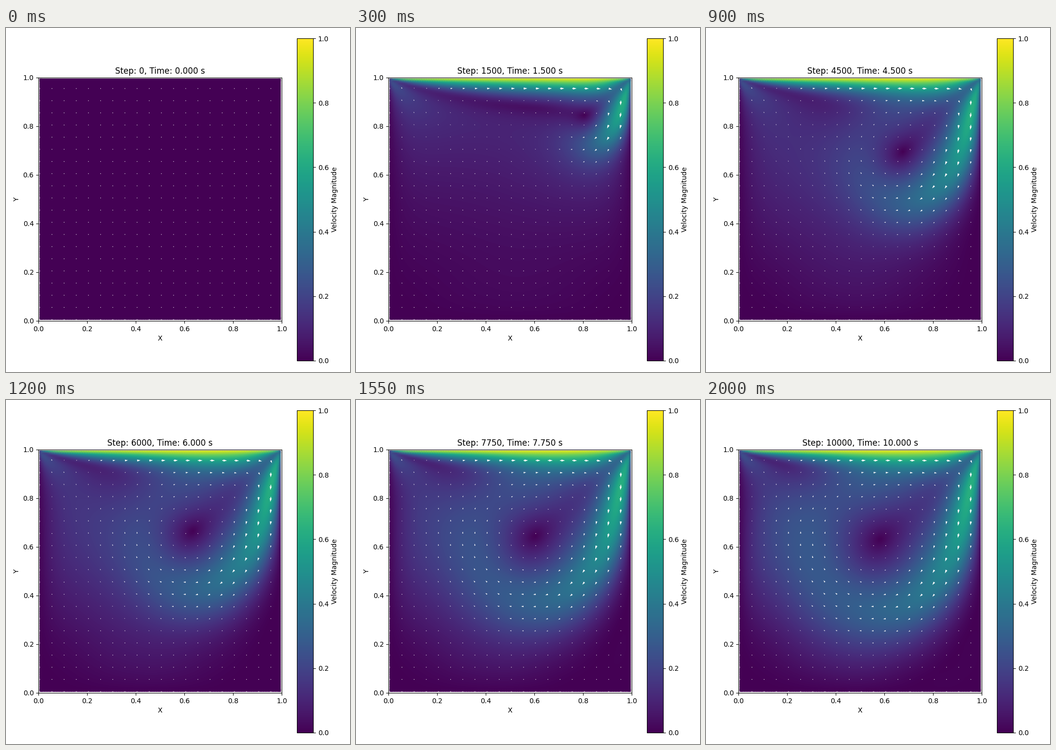
Animation, 700 px wide and 700 px high, one loop 2.05 s. Source, as a matplotlib script:

```python
import numpy as np
import matplotlib.pyplot as plt
from matplotlib.animation import FuncAnimation
from matplotlib.patches import Rectangle

# Lid-driven cavity on a staggered grid
N = 100
H = 1 / N
NU = 1 / 400
LID = 1.0
FRAMES = 41
STEPS = 75               # solver steps per frame
DT = 0.25 / STEPS

# Cosine basis that diagonalises the Neumann Laplacian
k = np.arange(N)
C = np.cos(np.pi * np.outer(k + 0.5, k) / N) * np.sqrt(2 / N)
C[:, 0] /= np.sqrt(2)
eig = (2 * np.sin(np.pi * k / (2 * N)) / H) ** 2
LAM = -(eig[:, None] + eig[None, :])
LAM[0, 0] = np.inf


def centred(u, v):
    return (u[:, 1:] + u[:, :-1]) / 2, (v[1:] + v[:-1]) / 2


def rates(u, v):
    """Convection plus diffusion on the inner faces."""
    ue = np.vstack([-u[:1], u, 2 * LID - u[-1:]])
    ve = np.hstack([-v[:, :1], v, -v[:, -1:]])
    uc, vc = centred(u, v)
    uv = (ue[1:] + ue[:-1]) * (ve[:, 1:] + ve[:, :-1]) / 4
    lap_u = u[:, 2:] + u[:, :-2] + ue[2:, 1:-1] + ue[:-2, 1:-1] - 4 * u[:, 1:-1]
    lap_v = v[2:] + v[:-2] + ve[1:-1, 2:] + ve[1:-1, :-2] - 4 * v[1:-1]
    du = NU / H**2 * lap_u - (np.diff(uc**2, axis=1)
                              + np.diff(uv[:, 1:-1], axis=0)) / H
    dv = NU / H**2 * lap_v - (np.diff(vc**2, axis=0)
                              + np.diff(uv[1:-1], axis=1)) / H
    return du, dv


def project(u, v):
    """Remove the divergence in place."""
    div = (np.diff(u, axis=1) + np.diff(v, axis=0)) / H
    p = C @ ((C.T @ div @ C) / LAM) @ C.T
    u[:, 1:-1] -= np.diff(p, axis=1) / H
    v[1:-1] -= np.diff(p, axis=0) / H


def simulate():
    u, v = np.zeros((N, N + 1)), np.zeros((N + 1, N))
    history = [centred(u, v)]
    old = None
    for _ in range(FRAMES - 1):
        for _ in range(STEPS):
            new = rates(u, v)
            old = old or new
            u[:, 1:-1] += DT * (1.5 * new[0] - 0.5 * old[0])
            v[1:-1] += DT * (1.5 * new[1] - 0.5 * old[1])
            project(u, v)
            old = new
        history.append(centred(u, v))
    return history


flow = simulate()

SIZE = 700
fig = plt.figure(figsize=(7, 7), dpi=100)


def place(left, top, width, height):
    return fig.add_axes([left / SIZE, 1 - (top + height) / SIZE,
                         width / SIZE, height / SIZE])


ax = place(66.3, 100.9, 494.9, 494.9)
cax = place(592.3, 21.2, 32.8, 655.6)

x = (k + 0.5) * H
X, Y = np.meshgrid(x, x)
zero = np.zeros((N, N))
look = dict(cmap="viridis", vmin=0, vmax=1)

image = ax.imshow(zero, origin="lower", extent=(0, 1, 0, 1),
                  interpolation="bilinear", **look)
image.set_clip_path(Rectangle((x[0], x[0]), 1 - H, 1 - H,
                              transform=ax.transData))

# Shaded border cells, so the field ends on the outer cell centres
every = slice(None)
borders = [(slice(0, 2), every), (slice(-2, None), every),
           (every, slice(0, 2)), (every, slice(-2, None))]
rims = [ax.pcolormesh(X[b], Y[b], zero[b], shading="gouraud", **look)
        for b in borders]

skip = (slice(None, None, 5),) * 2
arrows = ax.quiver(X[skip], Y[skip], zero[skip], zero[skip],
                   color="white", scale=30, zorder=2)

ax.set(xlim=(0, 1), ylim=(0, 1), xlabel="X", ylabel="Y")
title = ax.set_title("")
fig.colorbar(image, cax=cax, label="Velocity Magnitude")


def update(n):
    u, v = flow[n]
    speed = np.hypot(u, v)
    image.set_data(speed)
    for rim, b in zip(rims, borders):
        rim.set_array(speed[b])
    arrows.set_UVC(u[skip], v[skip])
    title.set_text(f"Step: {250 * n}, Time: {0.25 * n:.3f} s")
    return [image, *rims, arrows, title]


anim = FuncAnimation(fig, update, frames=FRAMES, interval=50,
                     repeat=True, repeat_delay=0, blit=False)
plt.show()
```
